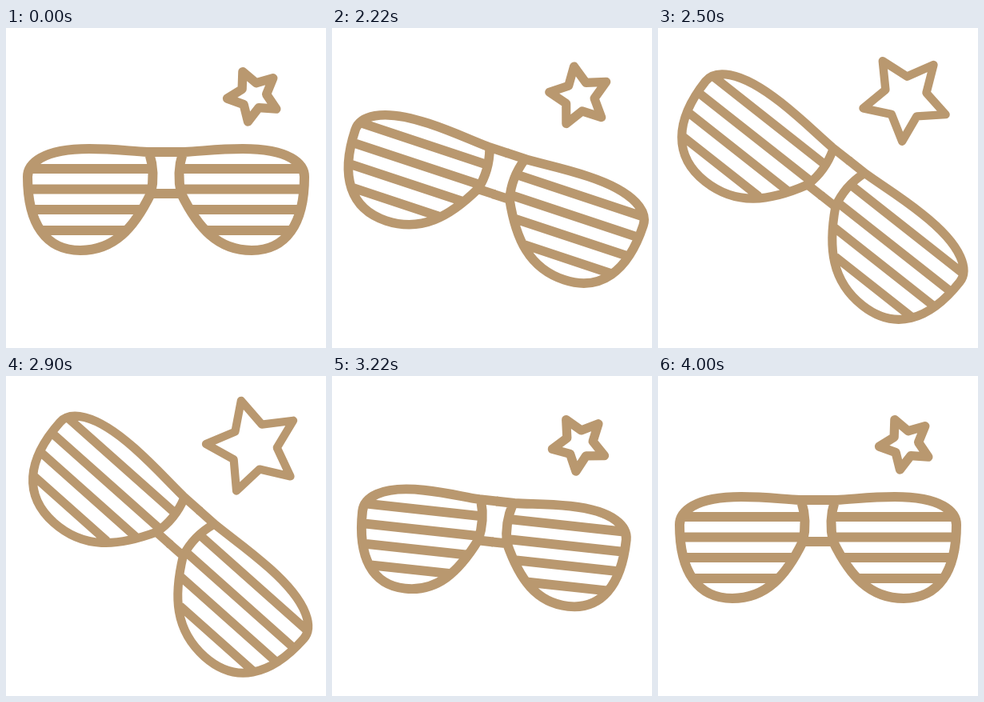
Recreate the animation shown at these times as an HTML page. Size 400 by 400 pixels, loop 4.02 s.

```html
<!DOCTYPE html>
<html>
<head>
<meta charset="utf-8">
<title>Party glasses</title>
<style>
html, body { margin: 0; width: 100%; height: 100%; overflow: hidden; background: #fff; }
svg { display: block; width: 100vw; height: 100vh; }
</style>
</head>
<body>
<svg viewBox="0 0 400 400" fill="none" stroke="#b9986f" stroke-linejoin="round">
  <g id="glasses">
    <path id="half" vector-effect="non-scaling-stroke" d="M201 155H177C155 154 135 151 104 151C45 151 27 170 27 186
      C27 245 50 278 93 278C135 278 160 250 181 207C185 190 184 172 179 156
      M201 207H181M29 176H183M28 201.5H182M34 227H169M43 253H148"/>
    <use href="#half" transform="matrix(-1 0 0 1 400 0)"/>
  </g>
  <path id="star"/>
</svg>
<script>
const LOOP = 4020, START = 2015, TOP = 2700, END = 4000;
const glasses = document.getElementById("glasses");
const star = document.getElementById("star");

// Sine ease from a to b; bend below 1 starts fast, above 1 starts slowly
function ease(t, t0, t1, a, b, bend = 1) {
  const u = Math.min(1, Math.max(0, (t - t0) / (t1 - t0)));
  return a + (b - a) * Math.sin(Math.PI / 2 * u ** bend) ** 2;
}

// Rise from 0 to peak, drop past 0 to dip, then settle back
function swing(t, peak, dip, dipTime, bend) {
  if (t < TOP) return ease(t, START, TOP, 0, peak, bend);
  if (t < dipTime) return ease(t, TOP, dipTime, peak, dip, 2.3);
  return ease(t, dipTime, END, dip, 0);
}

function starPath(x, y, radius, angle) {
  const points = [];
  for (let i = 0; i < 10; i++) {
    const a = (angle - 114 + i * 36) * Math.PI / 180;
    const r = i % 2 ? radius * 0.495 : radius;
    points.push((x + r * Math.cos(a)).toFixed(2) + " " + (y + r * Math.sin(a)).toFixed(2));
  }
  return "M" + points.join("L") + "Z";
}

function draw(now) {
  const t = now % LOOP;

  const tilt = swing(t, 42.3, -5.5, 3320, 0.65);
  const stretch = swing(t, 0.183, -0.055, 3260, 0.55);
  const lift = Math.max(0, tilt / 42);
  glasses.setAttribute("transform",
    `translate(${200 - lift} ${215 + 1.5 * lift}) rotate(${tilt})
     scale(${1 + stretch} ${1 + 0.42 * stretch}) translate(-200 -215)`);
  glasses.setAttribute("stroke-width", 12 - lift);

  const spin = swing(t, 83, -10, 3260, 1.1);
  const grow = swing(t, 1, 0, 3260, 1.05);
  star.setAttribute("d", starPath(309.3, 84.7 + 3.5 * grow, 33 + 27 * grow, spin));
  star.setAttribute("stroke-width", 11.3 - 1.1 * grow);
}

const start = performance.now();
function tick() {
  draw(performance.now() - start);
  requestAnimationFrame(tick);
}
tick();
</script>
</body>
</html>
```
